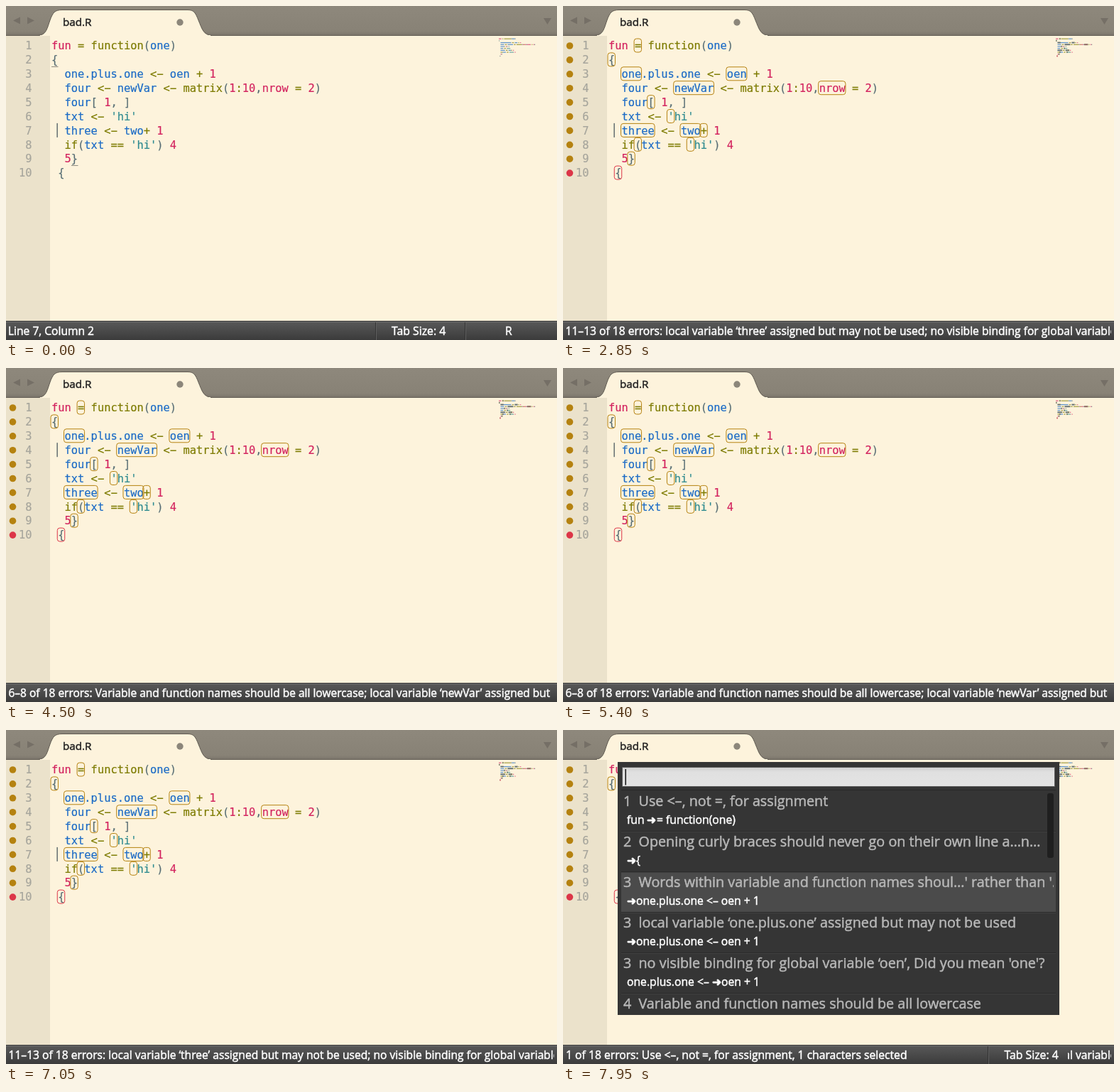
Animation of 776x470 px, one loop 8 s. Source, as an HTML page:

```html
<!DOCTYPE html>
<html lang="en">
<head>
<meta charset="utf-8">
<title>Editor with lint results</title>
<style>
html, body { margin: 0; width: 100%; height: 100%; overflow: hidden; background: #fdf3dc; }
svg { display: block; width: 776px; height: 470px; }
text { white-space: pre; font-family: "Open Sans", "Noto Sans", sans-serif; }
.code { font: 15.4px "DejaVu Sans Mono", monospace; stroke-width: .2px; }
.bold { stroke-width: .5px; }
.arrow { font-family: "DejaVu Sans", sans-serif; stroke-width: .9px; }
</style>
</head>
<body>
<svg id="stage" viewBox="0 0 776 470">
  <defs>
    <linearGradient id="bar" x2="0" y2="1">
      <stop stop-color="#8e887c"/><stop offset=".85" stop-color="#888276"/><stop offset="1" stop-color="#79736a"/>
    </linearGradient>
    <linearGradient id="foot" x2="0" y2="1">
      <stop stop-color="#5a5a5a"/><stop offset="1" stop-color="#3b3b3b"/>
    </linearGradient>
    <linearGradient id="field" x2="0" y2="1">
      <stop stop-color="#cfcfcf"/><stop offset=".25" stop-color="#e0e0e0"/><stop offset="1" stop-color="#e3e3e3"/>
    </linearGradient>
    <clipPath id="listClip"><rect x="77" y="82" width="614" height="319"/></clipPath>
    <clipPath id="footClip"><rect y="443" width="772" height="27"/></clipPath>
    <clipPath id="tailClip"><rect x="711" y="443" width="61" height="27"/></clipPath>
  </defs>
</svg>
<script>
const LOOP = 8000, CHAR = 9.27, ROW = 19.9, LEFT = 64;
const color = {
  str: '#2f8b90', red: '#d3245f', key: '#7d7b00', name: '#1b6bc6', mark: '#586e75',
  warn: '#b58210', error: '#dc3648'
};
const lines = [
  'fun = function(one)',
  '{',
  '  one.plus.one <- oen + 1',
  '  four <- newVar <- matrix(1:10,nrow = 2)',
  '  four[ 1, ]',
  "  txt <- 'hi'",
  '  three <- two+ 1',
  "  if(txt == 'hi') 4",
  '  5}',
  ' {'
];
// [line, column, length]
const issues = [
  [0, 4, 1], [1, 0, 1], [2, 2, 3], [2, 18, 3], [3, 10, 6], [3, 32, 4], [4, 6, 1], [5, 9, 1],
  [6, 2, 5], [6, 11, 3], [6, 14, 1], [7, 4, 1], [7, 12, 1], [8, 3, 1], [9, 1, 1]
];
const results = [
  [1, 'Use <–, not =, for assignment', [[90, 'fun'], [118, '➜'], [132, '= function(one)']]],
  [2, 'Opening curly braces should never go on their own line a…n…', [[90, '➜'], [103, '{']]],
  [3, "Words within variable and function names shoul…' rather than '.'", [[90, '➜'], [103, 'one.plus.one <– oen + 1']]],
  [3, 'local variable ‘one.plus.one’ assigned but may not be used', [[90, '➜'], [103, 'one.plus.one <– oen + 1']]],
  [3, "no visible binding for global variable ‘oen’, Did you mean 'one'?", [[90, 'one.plus.one <–'], [210, '➜'], [223, 'oen + 1']]],
  [4, 'Variable and function names should be all lowercase', []]
];
const line4 = '6–8 of 18 errors: Variable and function names should be all lowercase; local variable ‘newVar’ assigned but';
const line7 = '11–13 of 18 errors: local variable ‘three’ assigned but may not be used; no visible binding for global variable';

const steps = [
  { at: 0, line: 7, foot: 'plain' },
  { at: 2700, line: 7, foot: 'seven', lint: true },
  { at: 3300, line: 4, foot: 'four', lint: true },
  { at: 6600, line: 7, foot: 'seven', lint: true },
  { at: 7200, foot: 'list', lint: true, pick: 0 },
  { at: 7500, foot: 'list', lint: true, pick: 1 },
  { at: 7800, foot: 'list', lint: true, pick: 2 }
];

const stage = document.getElementById('stage');

function add(tag, attrs, parent = stage) {
  const el = document.createElementNS('http://www.w3.org/2000/svg', tag);
  for (const k in attrs) el.setAttribute(k, attrs[k]);
  return parent.appendChild(el);
}
const group = (parent, attrs) => add('g', attrs || {}, parent);
const rect = (x, y, width, height, fill, parent, more) =>
  add('rect', { x, y, width, height, fill, ...more }, parent);
function label(x, y, str, size, fill, parent, more) {
  const el = add('text', { x, y, fill, stroke: fill, 'font-size': size, class: 'bold', ...more }, parent);
  el.textContent = str;
  return el;
}
const white = (x, y, str, size, parent, more) => label(x, y, str, size, '#fff', parent, more);
const show = (el, on) => { el.style.display = on ? '' : 'none'; };
const colX = c => LEFT + c * CHAR;
const mapX = c => 694 + c * 1.25;
const mapY = i => 45.6 + i * 2.7;

// Editor
rect(0, 0, 776, 470, '#fdf3dc');
rect(0, 40, 62, 404, '#ebe2cb');
rect(0, 0, 776, 42, 'url(#bar)');
rect(0, 41, 776, 1, '#625d54');
add('path', {
  d: 'M45 41.5C57 41 58 31 62 20C66 9 69 5.500 79 5.500H256C265 5.500 267 10 271 20C276 32 278 41 290 41.500',
  fill: '#fdf3dc', stroke: '#5f5a51'
});
rect(48, 41, 240, 2, '#fdf3dc');
rect(48, 42, 14, 2, '#ebe2cb');
for (const d of ['M10 20.500L20 15.500V25.500Z', 'M40 20.500L30 15.500V25.500Z', 'M757 17H768L762.500 26Z'])
  add('path', { d, fill: '#756f66' });
label(80, 28, 'bad.R', 15.2, '#222');
add('circle', { cx: 245, cy: 23, r: 4.7, fill: '#8c867a' });

const token = /('hi')|(fun\b|nrow|\d+)|(function|matrix|if|<-|==?|[+:])|([a-zA-Z.]+)|(\S)/g;
const kinds = ['str', 'red', 'key', 'name', 'mark'];
lines.forEach((src, i) => {
  const y = 61.2 + i * ROW;
  label(36.5, y, i + 1, 15.4, '#a6a59c', stage, { class: 'code', 'text-anchor': 'end' });
  for (const m of src.matchAll(token)) {
    const fill = color[kinds[m.slice(1).findIndex(Boolean)]];
    label(colX(m.index), y, m[0].replace('-', '−'), 15.4, fill, stage, { class: 'code' });
    rect(mapX(m.index), mapY(i), m[0].length * 1.25, 1.2, fill, stage, { opacity: .7 });
  }
});

const pairs = group();
rect(64, 85, 9.5, 1, '#8d8a80', pairs);
rect(92, 224, 9.5, 1, '#8d8a80', pairs);

const lint = group();
issues.forEach(([i, c, n]) => {
  const stroke = i === 9 ? color.error : color.warn;
  rect(colX(c) - 1, 46 + i * ROW, n * CHAR + 1.2, 19, 'none', lint, { rx: 3.5, stroke });
  rect(mapX(c), mapY(i) - .6, n * 1.25 + .5, 2.2, i === 9 ? color.error : '#5f5a45', lint, { opacity: .6 });
});
lines.forEach((_, i) => add('circle', {
  cx: 9.5, cy: 56 + i * ROW, r: 4.8, fill: i === 9 ? color.error : color.warn
}, lint));

const caret = rect(71.5, 0, 1.3, 20, '#4c5a60');

// Status bar
rect(0, 443, 776, 27, 'url(#foot)');
rect(0, 443, 776, 1, '#333');
rect(0, 444, 776, 1, '#707070');
function divider(x, parent) {
  rect(x, 445, 1, 25, '#333', parent);
  rect(x + 1, 445, 1, 25, '#606060', parent);
}
const feet = {};
for (const k of ['plain', 'four', 'seven', 'list']) feet[k] = group(stage, { 'clip-path': 'url(#footClip)' });
white(3, 463, 'Line 7, Column 2', 15.6, feet.plain);
divider(520, feet.plain);
divider(646, feet.plain);
white(543, 463, 'Tab Size: 4', 15.8, feet.plain);
white(703, 463, 'R', 15.6, feet.plain);
white(3.5, 463, line4, 15.5, feet.four);
white(3.5, 463, line7, 15.6, feet.seven);
white(4, 463, '1 of 18 errors: Use <–, not =, for assignment, 1 characters selected', 15.7, feet.list);
divider(598, feet.list);
white(621.5, 463, 'Tab Size: 4', 15.8, feet.list);
white(3.5, 463, line7, 15.6, group(feet.list, { 'clip-path': 'url(#tailClip)' }));

// Result list
const panel = group();
rect(77, 45, 622, 356, '#353535', panel);
rect(83.5, 52.5, 609, 27, 'url(#field)', panel, { stroke: '#5c5c5c' });
rect(87.5, 55, 1.5, 22.5, '#111', panel);
rect(82, 84, 612, 1, '#282828', panel);
const picked = rect(82, 86, 612, 57, '#4b4b4b', panel);
const list = group(panel, { 'clip-path': 'url(#listClip)' });
results.forEach(([n, title, parts], i) => {
  const y = 86 + i * 57;
  if (i) {
    rect(82, y - 1, 612, 1, '#2b2b2b', panel);
    rect(82, y, 612, 1, '#404040', panel);
  }
  label(85, y + 20.5, n, 19.75, '#b8b8b8', list);
  label(106.5, y + 20.5, title, 19.75, '#b8b8b8', list);
  for (const [x, str] of parts)
    white(x, y + 45.5, str, 15.7, list, str === '➜' ? { class: 'arrow' } : {});
});
const thumb = rect(682, 89, 9, 91, '#1f1f1f', panel, { rx: 3 });

function draw(now) {
  const t = now % LOOP;
  const s = steps.filter(p => p.at <= t).pop();
  show(lint, s.lint);
  show(pairs, !s.lint);
  show(caret, s.line && (t - s.at) % 1050 < 525);
  if (s.line) caret.setAttribute('y', 45.5 + (s.line - 1) * ROW);
  for (const k in feet) show(feet[k], k === s.foot);
  show(panel, s.pick >= 0);
  show(thumb, s.pick > 0);
  if (s.pick >= 0) picked.setAttribute('y', 86 + s.pick * 57);
}
const start = performance.now();
function tick() {
  draw(performance.now() - start);
  requestAnimationFrame(tick);
}
tick();
</script>
</body>
</html>
```
